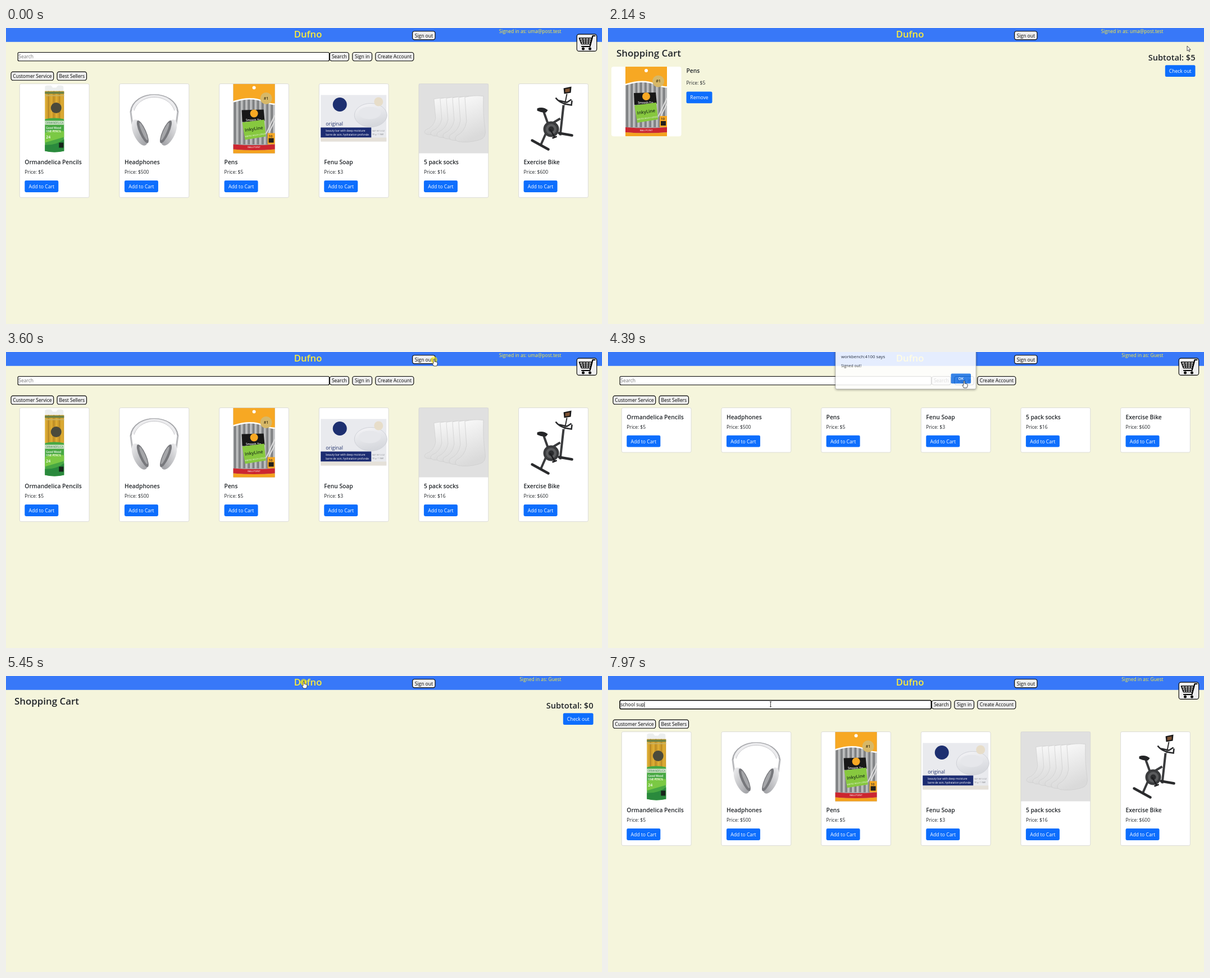
An HTML page for the animation above (8 s loop, 1061x528 px).

```html
<!DOCTYPE html>
<html lang="en">
<head>
<meta charset="utf-8">
<title>Shop demo</title>
<style>
  html, body { margin: 0; width: 100%; height: 100%; overflow: hidden; background: #f5f5dc; }
  svg { display: block; width: 1061px; height: 528px; }
  text { font-family: "Open Sans", "Noto Sans", sans-serif; font-size: 8.5px; white-space: pre; }
  .semi { font-weight: 600; }
</style>
</head>
<body>
<svg id="stage" viewBox="0 0 1061 528"></svg>
<script>
const LOOP = 8000, TICK = 66.5;
const INK = '#212529', BLUE = '#0d6efd', YELLOW = '#ffee38';

const rect = (x, y, w, h, fill, extra = '') =>
  `<rect x="${x}" y="${y}" width="${w}" height="${h}" fill="${fill}" ${extra}/>`;
const disc = (x, y, r, fill, extra = '') => `<circle cx="${x}" cy="${y}" r="${r}" fill="${fill}" ${extra}/>`;
const oval = (x, y, rx, ry, fill, extra = '') =>
  `<ellipse cx="${x}" cy="${y}" rx="${rx}" ry="${ry}" fill="${fill}" ${extra}/>`;
const path = (d, fill, extra = '') => `<path d="${d}" fill="${fill}" ${extra}/>`;
const line = (d, stroke, width, extra = '') => path(d, 'none', `stroke="${stroke}" stroke-width="${width}" ${extra}`);
const text = (x, y, str, fill = INK, size = 8.5, extra = '') =>
  `<text x="${x}" y="${y}" fill="${fill}" style="font-size:${size}px" ${extra}>${str}</text>`;
const semi = (x, y, str, size, fill = INK, extra = '') => text(x, y, str, fill, size, `class="semi" ${extra}`);
const group = (id, body) => `<g id="${id}">${body}</g>`;
const place = (transform, body) => `<g transform="${transform}">${body}</g>`;
const move = (x, y, body) => place(`translate(${x} ${y})`, body);
const repeat = (n, make) => Array.from({ length: n }, (_, i) => make(i)).join('');
const fade = (id, from, to) =>
  `<linearGradient id="${id}" x1="0" y1="0" x2=".3" y2="1">
    <stop offset=".1" stop-color="${from}"/><stop offset="1" stop-color="${to}"/></linearGradient>`;

const plainButton = (x, y, w, label) =>
  rect(x, y, w, 15.2, '#efefef', 'rx="3.6" stroke="#000" stroke-width="1.15"') +
  text(x + w / 2, y + 10.8, label, '#000', 8.5, 'text-anchor="middle"');
const blueButton = (x, y, w, label) =>
  rect(x, y, w, 20.9, BLUE, 'rx="2.4"') + text(x + w / 2, y + 13.9, label, '#fff', 8.6, 'text-anchor="middle"');

// Product pictures, each on a 124 x 124 field
const pencils =
  path('M45 13V6q0-3 4-3h7l3 4h6l3-4h5q5 0 5 3v7z', '#eceeee') +
  rect(45, 13, 34, 50, '#d3a02c') +
  repeat(7, i => rect(46 + i * 4.8, 13, 1.2, 50, i % 2 ? '#a57b25' : '#e6b93f')) +
  rect(45, 14, 34, 4, '#6d8246') + rect(45, 20, 34, 2, '#c9b263') +
  disc(65, 43, 9.5, '#4b4a3b') +
  path('M45 63q17-4 34 0v57q-17 4-34 0z', '#48a843') +
  rect(45, 66, 34, 7, '#d5e8cd') + text(62, 71.6, 'ORMANDELICA', '#26713a', 4.5, 'text-anchor="middle"') +
  path('M45 88q17-9 34-3v10l-34 10z', '#7bc944') +
  semi(47, 80, 'Good Wood', 4.8, '#fff') + semi(47, 86, 'FINE PENCIL', 4.6, '#fff') +
  semi(47, 97, '24', 7, '#fff') +
  path('M45 109q20 1 34-10v21q-17 4-34 0z', '#2a8a3d') + rect(70, 105, 8, 9, '#17251b');

const earCup = (x, side) => place(`translate(${x} 87) scale(${side} 1) rotate(-24)`,
  oval(0, 0, 11, 25, 'url(#metal)') + oval(5.5, 1, 6, 22, '#77787c') + oval(7, 1, 3, 17, '#a5a6a9'));
const headphones =
  line('M23 72L20 50C25 10 99 10 104 50L101 72', '#b9babd', 3) +
  line('M24 46C34 13 90 13 100 46', '#ececee', 5) +
  line('M20 50C26 9 98 9 104 50', '#9fa0a4', 1.2) + line('M26 48C36 16 88 16 98 48', '#c4c4c8', 1) +
  earCup(36, 1) + earCup(88, -1);

const pens =
  rect(25, 0, 74, 124, '#a9aaab') +
  repeat(9, i => rect(26.5 + i * 8.2, 14, 3.2, 94, '#7d7f81') + rect(31 + i * 8.2, 14, 1.6, 94, '#c9cacb')) +
  path('M25 0H99V36C84 39 72 17 25 32z', '#f7a823') +
  line('M25 32C72 17 84 39 99 36', '#fff', 2.5) +
  disc(62, 7, 3, '#fff') +
  disc(83.5, 26, 10.5, '#d7b868') + semi(83.5, 28, '#1', 7, '#3e3213', 'text-anchor="middle"') +
  path('M40 47L79 46 81 66 41 68z', '#181818') + disc(62, 53, 7, '#f7a823') +
  semi(61, 66, 'Smooth Tip', 5, '#fff', 'text-anchor="middle"') +
  path('M41 69L80 64 83 94 46 100z', '#87c83f') +
  place('rotate(-8 63 82)',
    semi(62, 83, 'InkyLine', 8, '#20351a', 'text-anchor="middle"') +
    text(64, 93, 'WRITES MUCH LONGER', '#fff', 3.6, 'text-anchor="middle"')) +
  line('M84 88L99 56M88 88L99 66', '#ddd', 2) +
  rect(86, 88, 13, 20, '#f7a823') + semi(88, 95, '10', 6) + rect(88, 97, 9, 8, '#23211c') +
  path('M25 108q37 3 74 0v9q-37 3-74 0z', '#cc2630') +
  text(62, 114.8, 'BALLPOINT', '#fff', 4.3, 'text-anchor="middle"') +
  path('M25 117q37 3 74 0v7H25z', '#f4a21f');

const soap =
  rect(3, 20, 117, 83, '#e9eaee') +
  oval(92, 56, 29, 21, 'url(#bar)', 'stroke="#d0d2d8"') + oval(90, 52, 20, 11, '#e6e7eb') +
  disc(37, 37, 12.5, '#1d2f70') + disc(106, 32, 8, '#e7ddc9') +
  text(12, 74, 'original', '#24356f', 8.8) + rect(3, 78, 90, 18, '#1c2c72') +
  text(12, 85, 'beauty bar with deep moisture', '#fff', 4.9) +
  text(12, 92, 'barre de soin, hydratation profonde', '#fff', 4.6) +
  rect(3, 96, 117, 7, '#e5e1d9') + text(95, 85, 'NET WT 3 OZ', '#8a8c91', 3.6) + text(95, 91, '90 g / 1 BAR', '#8a8c91', 3.6);

const sock = 'M82 24Q97 20 115 22Q114 55 118 80Q121 97 108 100Q88 106 70 103Q62 100 67 93Q82 86 85 67Z';
const socks = rect(0, 0, 124, 124, '#e0e0e0') +
  repeat(6, i => place(`translate(${(i - 5) * 11} ${(5 - i) * 1.6}) scale(1 ${.8 + i * .04})`,
    path(sock, 'url(#cloth)', 'stroke="#cfcfcf" stroke-width=".8"')));

const bike =
  line('M80 38L74 92M74 62L54 74M44 48L54 76L40 108', '#3a3b3d', 4) +
  line('M24 101L53 117M72 88L95 92', '#2a2b2d', 4.5, 'stroke-linecap="round"') +
  line('M66 25Q74 36 94 38L95 30M72 30L86 33L94 28', '#28292b', 2.6) +
  path('M33 44q10-4 19 3l-3 4q-8 1-16-3z', '#242527') +
  disc(58, 81, 14, '#3a3b3d') + disc(58, 81, 9.5, '#5a5b5d') + disc(58, 81, 5, '#2b2c2e') +
  line('M56 81L64 95M60 97l8-3', '#1c1c1e', 2.5) +
  line('M86 18L82 38', '#333', 2) +
  path('M80 8L94 5 93 16 81 18z', '#191919') + path('M83 9.5L91 8 91 14 83 15.5z', '#7d5233');

const products = [
  ['Ormandelica Pencils', 5, pencils], ['Headphones', 500, headphones], ['Pens', 5, pens],
  ['Fenu Soap', 3, soap], ['5 pack socks', 16, socks], ['Exercise Bike', 600, bike]
];
const cards = withPicture => products.map(([name, price, picture], i) => {
  const drop = withPicture ? 123.4 : 0;
  return move(24.3 + 177.65 * i, 99.5,
    rect(0, 0, 123.8, 79.6 + drop, '#fff', 'rx="2.5"') + (withPicture ? picture : '') +
    rect(0, 0, 123.8, 79.6 + drop, 'none', 'rx="2.5" stroke="#d5d5d2" stroke-width=".8"') +
    move(9, drop, semi(0, 20.2, name, 10.3) + text(0, 37, `Price: $${price}`) + blueButton(0, 49.2, 60, 'Add to Cart')));
}).join('');

const cartIcon =
  rect(1016.2, 11.1, 35.5, 30.3, '#efefef', 'rx="4" stroke="#000" stroke-width="1.15"') +
  line('M1048.5 14H1044.5L1039.5 33H1025', '#000', 2.2, 'stroke-linejoin="round" stroke-linecap="round"') +
  line('M1020.5 18H1043L1040.5 28.5H1024.5Z', '#000', 1.7, 'stroke-linejoin="round"') +
  line('M1022 21.5H1041.5M1023.5 25H1041M1026.5 18L1028.5 28M1032 18V28M1037.5 18L1036.5 28', '#000', 1.3) +
  disc(1027.5, 37, 2.5, '#000') + disc(1039.5, 37, 2.5, '#000');

const home =
  cartIcon +
  rect(21.2, 43.5, 554.2, 15.2, '#fff', 'id="field" rx="2" stroke="#000"') +
  text(22.3, 54.3, '', '#000', 8.5, 'id="query"') +
  rect(22, 46.2, .7, 10, '#000', 'id="caret"') +
  plainButton(576.3, 43.5, 34, 'Search') + plainButton(616.8, 43.5, 34.7, 'Sign in') +
  plainButton(657.8, 43.5, 68, 'Create Account') +
  plainButton(9, 78.1, 75.7, 'Customer Service') + plainButton(91, 78.1, 52.5, 'Best Sellers') +
  group('full', cards(true)) + group('bare', cards(false));

const cart =
  semi(15, 51.3, 'Shopping Cart', 16.9) +
  semi(1045.5, 58.4, '', 14.6, INK, 'id="subtotal" text-anchor="end"') +
  blueButton(991.8, 66.2, 53.7, 'Check out') +
  group('item',
    rect(6, 69, 124.5, 124.3, '#fff', 'rx="4"') + move(6, 69, pens) +
    semi(139.5, 80, 'Pens', 10.3) + text(139.5, 101, 'Price: $5') + blueButton(139.5, 113.4, 46, 'Remove'));

const dialog =
  rect(405, -6, 250, 72, '#fff', 'rx="2.5" stroke="#aaa" stroke-width=".7" style="filter:drop-shadow(0 1px 2px #0007)"') +
  text(415, 11, 'workbench:4100 says', '#202124', 7.8) + text(415, 26.8, 'Signed out!', '#202124', 6.9) +
  rect(610.5, 38.6, 35.5, 17.6, '#1a73e8', 'rx="2"') +
  semi(628.2, 49.8, 'OK', 6.6, '#fff', 'text-anchor="middle"');

const outline = 'stroke="#222" stroke-width=".8" stroke-linejoin="round"';
const cursors =
  disc(0, 2, 6, '#ffee00', 'id="click" opacity=".6"') +
  group('arrow', path('M0 0V9L2.1 7.1 3.5 10.3 4.9 9.7 3.5 6.6H6.2Z', '#fff', outline)) +
  group('hand', path('M-1 1Q0-.6 1 1V5L5 6Q6 6.2 6 7.5V10L4.6 13H-.6L-3 8.6Q-3 7.2-1 8.4Z', '#fff', outline)) +
  group('beam', line('M-1.6-4.5H1.6M-1.6 4.5H1.6M0-4.5V4.5', '#222', .9));

document.getElementById('stage').innerHTML =
  fade('metal', '#ececee', '#a4a5a9') + fade('cloth', '#f8f8f8', '#dadada') + fade('bar', '#f2f2f5', '#d6d8dd') +
  rect(0, 0, 1061, 528, '#f5f5dc') + rect(0, 0, 1061, 24.8, '#3878f8') +
  semi(537.5, 17.2, 'Dufno', 16.7, YELLOW, 'text-anchor="middle"') +
  plainButton(723.6, 5.7, 40.4, 'Sign out') +
  text(988.6, 9.4, '', YELLOW, 8.45, 'id="user" text-anchor="end"') +
  group('home', home) + group('cart', cart) + group('dialog', dialog) + group('cursor', cursors);

const el = {};
document.querySelectorAll('[id]').forEach(node => el[node.id] = node);
const show = (id, on) => el[id].style.display = on ? '' : 'none';
const setText = (id, str) => { if (el[id].textContent !== str) el[id].textContent = str; };
const between = (v, a, b) => v >= a && v < b;

// Pointer stops: time, x, y
const stops = [
  [130, 981, 514], [460, 533, 226], [598, 533, 226], [1460, 743, 16], [1535, 743, 16],
  [1930, 1034, 26], [2060, 1034, 26], [2128, 1031, 32], [2400, 1029, 31], [2800, 489, 14],
  [2870, 489, 14], [3260, 790, 13], [3460, 762, 12], [3670, 762, 12], [4200, 634, 51],
  [4400, 634, 51], [4850, 1022, 28], [5060, 1022, 28], [5450, 530, 9], [5530, 530, 9], [5900, 289.5, 50.5]
];
const clicks = [1930, 2790, 3590, 4250, 4850, 5440, 5850];
const keyTimes = [6450, 6510, 6650, 6840, 6970, 7110, 7310, 7440, 7710, 7970];

function pointerAt(t) {
  const next = stops.findIndex(s => s[0] > t);
  if (next < 0) return stops[stops.length - 1].slice(1);
  const [t0, x0, y0] = stops[Math.max(next - 1, 0)], [t1, x1, y1] = stops[next];
  const u = (t - t0) / (t1 - t0), k = u * u * (3 - 2 * u);
  return [x0 + (x1 - x0) * k, y0 + (y1 - y0) * k];
}

function render(time) {
  const t = Math.floor((time + 12) / TICK) * TICK;
  const inCart = between(t, 2000, 2870) || between(t, 5060, 5530);
  const guest = t >= 3730, alerting = between(t, 3730, 4450), focused = t >= 5900;

  show('home', !inCart);
  show('cart', inCart);
  show('item', !guest);
  show('full', !alerting);
  show('bare', alerting);
  show('dialog', alerting);
  el.dialog.setAttribute('opacity', t > 4380 ? .87 : 1);
  setText('subtotal', guest ? 'Subtotal: $0' : 'Subtotal: $5');
  setText('user', 'Signed in as: ' + (guest ? 'Guest' : 'uma@post.test'));

  const typed = 'school sup'.slice(0, keyTimes.filter(k => k <= time).length);
  setText('query', typed || 'Search');
  el.query.setAttribute('fill', typed ? '#000' : '#757575');
  el.field.setAttribute('stroke-width', focused ? 1.6 : 1.15);
  show('caret', focused);
  if (focused) el.caret.setAttribute('x', 22.2 + (typed ? el.query.getComputedTextLength() : 0));

  const [x, y] = pointerAt(t);
  const overField = !inCart && !alerting && between(x, 21, 575) && between(y, 43, 59);
  const overButton = between(x, 723, 765) && between(y, 6, 22) || between(x, 480, 572) && y < 24 ||
    !inCart && x > 1016 && between(y, 11, 42) || alerting && between(x, 610, 647) && between(y, 38, 57);
  show('cursor', t >= 130);
  show('beam', overField);
  show('hand', !overField && overButton);
  show('arrow', !overField && !overButton);
  show('click', clicks.some(c => between(t, c - 1, c + 130)));
  el.cursor.setAttribute('transform', `translate(${x} ${y})`);
}

function loop(now) {
  render(now % LOOP);
  requestAnimationFrame(loop);
}
render(0);
requestAnimationFrame(loop);
</script>
</body>
</html>
```
